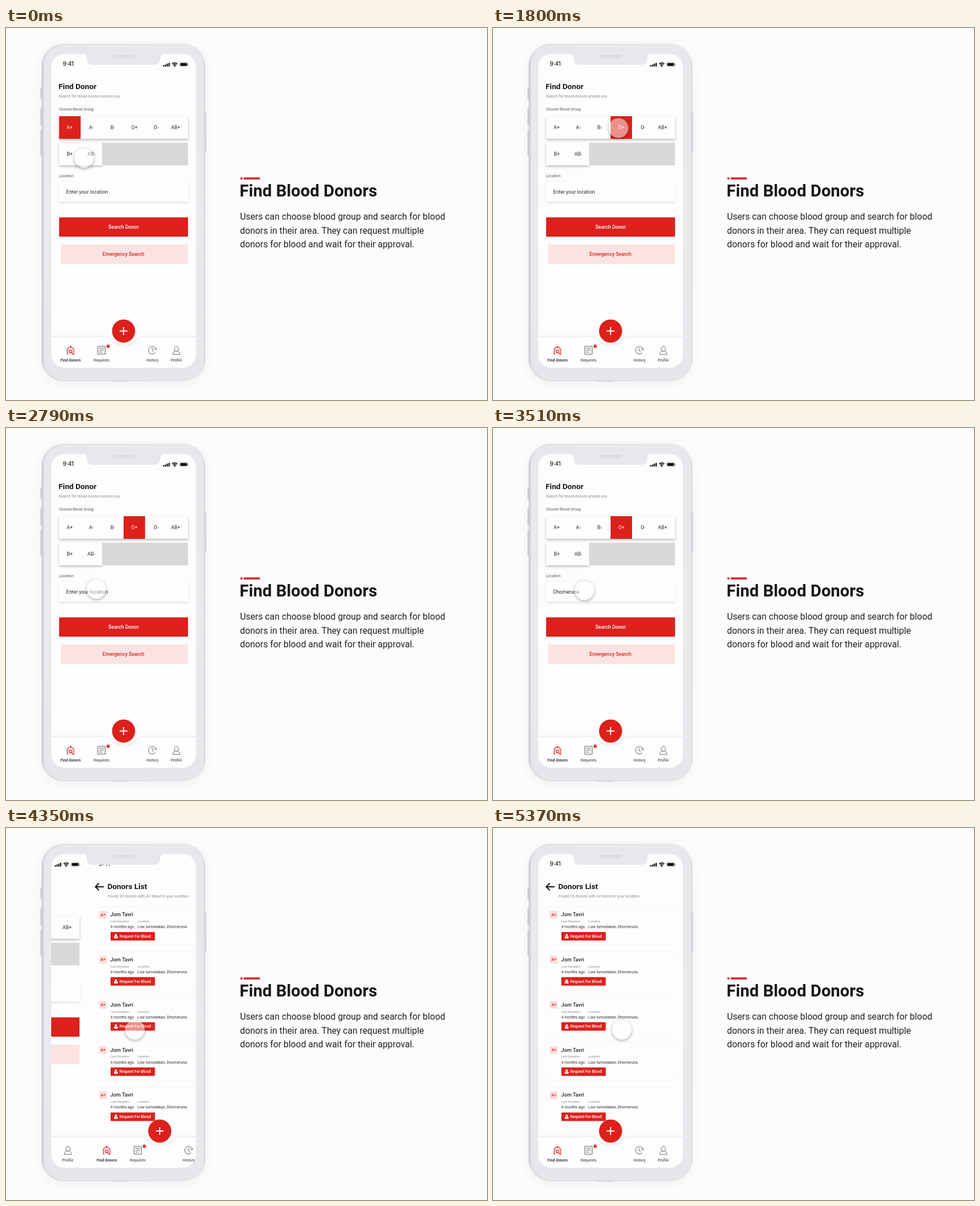
These frames come from a looping animation (851x658 px, 5400 ms). An HTML page with a canvas:

```html
<!DOCTYPE html>
<html lang="en">
<head>
<meta charset="utf-8">
<title>Find Blood Donors</title>
<style>
  html, body { margin: 0; width: 100%; height: 100%; overflow: hidden; background: #fcfcfc; }
  canvas { display: block; }
</style>
</head>
<body>
<canvas id="stage" width="851" height="658"></canvas>
<script>
const ctx = document.getElementById('stage').getContext('2d');
const LOOP = 5400, STEP = 30;
const RED = '#dc211c', INK = '#161616', PAPER = '#fdfdfd';
const SCREEN = { x: 80, y: 46, w: 256, h: 555, r: 23 };
const PLACE = 'Dhomeruna';

const clamp = v => Math.max(0, Math.min(1, v));
const span = (t, from, to) => clamp((t - from) / (to - from));
const easeOut = p => 1 - (1 - p) * (1 - p);
const easeInOut = p => p < 0.5 ? 2 * p * p : 1 - 2 * (1 - p) * (1 - p);

// time, x, y
const pointerPath = [
  [0, 138, 230], [500, 224, 177], [1200, 224, 177], [1700, 222, 177],
  [2150, 222, 177], [2740, 160, 285], [3450, 160, 285], [3960, 228, 357]
];
const SELECT_AT = 930, SELECT_END = 1330, FILL_AT = 3150, PUSH_AT = 4230, PUSH_END = 4470;

function text(str, x, y, size, color = INK, weight = 400, align = 'left', family = 'Roboto') {
  ctx.font = `${weight} ${size}px ${family}, sans-serif`;
  ctx.textAlign = align;
  ctx.fillStyle = color;
  ctx.fillText(str, x, y);
}

function rect(x, y, w, h, color, r = 0) {
  ctx.beginPath();
  ctx.roundRect(x, y, w, h, r);
  ctx.fillStyle = color;
  ctx.fill();
}

function disc(x, y, r, color) {
  ctx.beginPath();
  ctx.arc(x, y, r, 0, Math.PI * 2);
  ctx.fillStyle = color;
  ctx.fill();
}

function line(d, color, width) {
  ctx.strokeStyle = color;
  ctx.lineWidth = width;
  ctx.stroke(new Path2D(d));
}

function withShadow(color, blur, dy, draw) {
  ctx.save();
  ctx.shadowColor = color;
  ctx.shadowBlur = blur;
  ctx.shadowOffsetY = dy;
  draw();
  ctx.restore();
}

function card(x, y, w, h, strength) {
  withShadow(`rgba(0,0,0,${strength})`, 4, 1.5, () => rect(x, y, w, h, PAPER));
}

function drawBody() {
  rect(61, 105, 4, 21, '#cfd1d5', 1);
  rect(61, 142, 4, 31, '#cfd1d5', 1);
  rect(61, 180, 4, 46, '#cfd1d5', 1);
  rect(351, 150, 3.2, 71, '#d6d8dc', 1);

  const side = ctx.createLinearGradient(63, 0, 353, 0);
  side.addColorStop(0, '#c9cbd0');
  side.addColorStop(0.02, '#dcdee2');
  side.addColorStop(0.5, '#dfe1e5');
  side.addColorStop(0.98, '#e2e4e7');
  side.addColorStop(1, '#d3d5d9');
  withShadow('rgba(0,0,0,0.05)', 20, 3, () => rect(63, 28, 289.5, 597, side, 39));

  const face = ctx.createLinearGradient(0, 30, 0, 622);
  face.addColorStop(0, '#e7e8eb');
  face.addColorStop(0.5, '#e9eaed');
  face.addColorStop(1, '#e5e7ea');
  rect(67, 29.5, 283, 593, face, 36);
  rect(184, 623.5, 29, 2, '#d2d4d8', 1);
}

function drawNotch() {
  ctx.fillStyle = '#e7e8eb';
  ctx.fill(new Path2D('M136 45 H280 V46 Q273 46 273 53 V54 Q273 65 262 65 H154 Q143 65 143 54 V53 Q143 46 136 46 Z'));
  rect(190, 48, 37, 4.5, '#d2d4d7', 2.2);
  rect(191, 49, 35, 2.8, '#dfe0e3', 1.4);
}

function drawStatus() {
  text('9:41', 100.5, 67, 9.8, '#1c1c1c', 500, 'left', 'Inter');
  for (let i = 0; i < 4; i++) rect(278 + i * 3.2, 65.8 - i * 1.4, 2.2, 2.4 + i * 1.4, '#111', 0.5);
  ctx.save();
  ctx.beginPath();
  ctx.moveTo(298.5, 69);
  ctx.lineTo(292, 61.5);
  ctx.lineTo(292, 58);
  ctx.lineTo(305, 58);
  ctx.lineTo(305, 61.5);
  ctx.clip();
  ctx.strokeStyle = '#111';
  ctx.lineWidth = 1.5;
  for (const r of [4.2, 6.8]) {
    ctx.beginPath();
    ctx.arc(298.5, 68.3, r, Math.PI, 0);
    ctx.stroke();
  }
  disc(298.5, 67.5, 2, '#111');
  ctx.restore();
  ctx.beginPath();
  ctx.roundRect(307.4, 60.9, 14, 7.2, 2);
  ctx.strokeStyle = '#888';
  ctx.lineWidth = 0.7;
  ctx.stroke();
  rect(308.5, 62, 11.8, 5, '#111', 1);
  rect(322.2, 63, 1, 3, '#777', 0.5);
}

function drawNav() {
  withShadow('rgba(0,0,0,0.10)', 4, -1, () => {
    ctx.fillStyle = PAPER;
    ctx.fill(new Path2D('M70 547 H172 Q180 547 183 550 C190 567 226 567 233 550 Q236 547 244 547 H346 V610 H70 Z'));
  });
  disc(208, 536, 20.5, RED);
  line('M201 536 H215 M208 529 V543', '#fff', 1.9);

  ctx.lineCap = ctx.lineJoin = 'round';
  line('M110 576.8 H108.3 V568 L114 563.2 L119.8 568 V576.8 H118.5', RED, 1.2);
  line('M116.7 572 A2.7 2.7 0 1 1 111.3 572 A2.7 2.7 0 1 1 116.7 572 M116 574 L118.5 577', RED, 1.2);

  const grey = '#5c5c5c';
  line('M163 563 H175.5 V577 H163 Z M165.5 566.5 H173 M165.5 569.8 H173 M165.5 573.2 H170', grey, 1);
  disc(180.8, 563, 2.9, RED);
  text('1', 180.8, 564.6, 4.2, '#fff', 500, 'center');
  line('M263.7 574.6 A6.7 6.7 0 1 1 264.8 567 M262.5 568 L265.3 569.3 L266.6 566.3 M258.7 566 V570.7 L261.2 572.2', grey, 1);
  line('M305.3 567.4 A3.8 4.2 0 1 1 297.7 567.4 A3.8 4.2 0 1 1 305.3 567.4', grey, 0.9);
  line('M295.2 577 C295.2 573.5 297 572 299 571.5 H304 C306 572 307.8 573.5 307.8 577 Z', grey, 0.9);
  ctx.lineCap = 'butt';
  ctx.lineJoin = 'miter';

  text('Find donors', 114.3, 590.2, 6.8, '#222', 500, 'center');
  text('Requests', 169, 590.2, 6.7, grey, 500, 'center');
  text('History', 259.3, 590.2, 6.7, grey, 500, 'center');
  text('Profile', 301.3, 590.2, 6.7, grey, 500, 'center');
}

function drawForm(t) {
  text('Find Donor', 93, 108, 13.7, INK, 700);
  text('Search for blood donors around you', 93.4, 123.3, 6.82, '#8b8b8b');
  text('Choose Blood Group', 93.4, 146.3, 6.8, '#5a5a5a');

  card(94, 156, 228, 40, 0.28);
  card(94, 203, 76, 40, 0.28);
  rect(170, 203, 152, 40, '#d8d8d8');
  rect(94 + 114 * easeOut(span(t, SELECT_AT, SELECT_END)), 156, 38, 40, RED);

  const picked = t < SELECT_AT ? 0 : 3;
  const centres = [112.6, 150.8, 188.8, 227.2, 265.4, 300.2];
  ['A+', 'A-', 'B-', 'O+', 'O-', 'AB+'].forEach((g, i) =>
    text(g, centres[i], 179, 8.8, i === picked ? '#fff' : '#2a2a2a', 400, 'center'));
  text('B+', 113, 226, 8.8, '#2a2a2a', 400, 'center');
  text('AB-', 150.8, 226, 8.8, '#2a2a2a', 400, 'center');

  text('Location', 93.4, 263.7, 6.8, '#5a5a5a');
  card(94, 272, 229, 35, 0.1);
  text(t < FILL_AT ? 'Enter your location' : PLACE, 106.6, 293, 8.9, '#2a2a2a');

  withShadow('rgba(0,0,0,0.15)', 3, 1, () => rect(94, 335, 228, 34, RED, 1));
  text('Search Donor', 208, 355, 8.95, '#fff', 500, 'center');
  rect(97, 383, 225, 34.5, '#fce3e3', 1);
  text('Emergency Search', 207.7, 403.4, 8.9, RED, 500, 'center');
}

function drawDonor(y) {
  ctx.strokeStyle = '#f5f5f5';
  ctx.lineWidth = 1;
  ctx.strokeRect(94.5, y - 13.5, 228, 67);
  rect(100.5, y - 6.5, 14, 13.5, '#fbdddd', 1);
  text('A+', 107.5, y + 2.6, 7, RED, 500, 'center');
  text('Jom Tavri', 120.6, y + 3.2, 9.2, '#222', 500);
  text('Last Donation', 120.8, y + 14, 5.4, '#8a8a8a');
  text('Location', 168.8, y + 14, 5.4, '#8a8a8a');
  text('4 months ago', 120.8, y + 24.2, 6.8, '#333');
  text('Low tumodakan, ' + PLACE, 168.8, y + 24.2, 6.83, '#333');
  rect(121, y + 31, 78.5, 15, RED, 1);
  disc(130.4, y + 36.5, 1.9, '#fff');
  rect(127.2, y + 38.3, 6.4, 4, '#fff', 1.2);
  rect(130, y + 38.6, 0.8, 2.4, RED);
  text('Request For Blood', 136.8, y + 40.8, 6.75, '#fff', 500);
}

function drawList() {
  line('M94.5 104 H109 M100.5 97.7 L94.2 104 L100.5 110.3', '#111', 2);
  text('Donors List', 115.4, 108, 13.7, INK, 700);
  text('Found 23 donors with A+ blood in your location', 115.9, 123.3, 6.85, '#8b8b8b');
  ctx.save();
  ctx.beginPath();
  ctx.rect(80, 130, 256, 390);
  ctx.clip();
  for (let i = 0; i < 5; i++) drawDonor(153 + i * 79.8);
  ctx.restore();
}

function drawPage(dx, content) {
  ctx.save();
  ctx.translate(dx, 0);
  ctx.beginPath();
  ctx.rect(SCREEN.x, SCREEN.y, SCREEN.w, SCREEN.h);
  ctx.clip();
  content();
  drawNav();
  drawStatus();
  ctx.restore();
}

function drawScreen(t) {
  const { x, y, w, h, r } = SCREEN;
  const push = easeOut(span(t, PUSH_AT, PUSH_END));
  rect(x, y, w, h, PAPER, r);
  ctx.save();
  ctx.clip();
  if (push < 1) drawPage(-w * push, () => drawForm(t));
  if (push > 0) drawPage(w * (1 - push), drawList);
  ctx.restore();
  drawNotch();
}

function pointerAt(t) {
  const next = pointerPath.findIndex(k => k[0] > t);
  if (next < 0) return pointerPath[pointerPath.length - 1].slice(1);
  const a = pointerPath[next - 1], b = pointerPath[next];
  const p = easeInOut(span(t, a[0], b[0]));
  return [a[1] + (b[1] - a[1]) * p, a[2] + (b[2] - a[2]) * p];
}

function drawPointer(t) {
  const [x, y] = pointerAt(t), r = 17.3;
  ctx.save();
  ctx.beginPath();
  ctx.rect(x - 40, y - 40, 80, 80);
  ctx.arc(x, y, r, 0, Math.PI * 2);
  ctx.clip('evenodd');
  withShadow('rgba(0,0,0,0.36)', 5, 1.5, () => disc(x, y, r, '#fff'));
  ctx.restore();
  disc(x, y, r, 'rgba(255,255,255,0.5)');
}

function drawCopy() {
  rect(414.7, 264.3, 3.6, 3.6, '#dc2127');
  rect(420.7, 264.3, 28.4, 3.6, '#dc2127');
  text('Find Blood Donors', 413.2, 298.4, 29.5, INK, 700);
  [
    'Users can choose blood group and search for blood',
    'donors in their area. They can request multiple',
    'donors for blood and wait for their approval.'
  ].forEach((s, i) => text(s, 414, 339.4 + i * 24.3, 15.85, '#222'));
}

function draw(t) {
  ctx.fillStyle = '#fcfcfc';
  ctx.fillRect(0, 0, 851, 658);
  drawBody();
  drawScreen(t);
  drawPointer(t);
  drawCopy();
}

const start = performance.now();
function tick() {
  const t = (performance.now() - start) % LOOP;
  draw(Math.floor(t / STEP) * STEP);
  requestAnimationFrame(tick);
}
tick();
</script>
</body>
</html>
```
